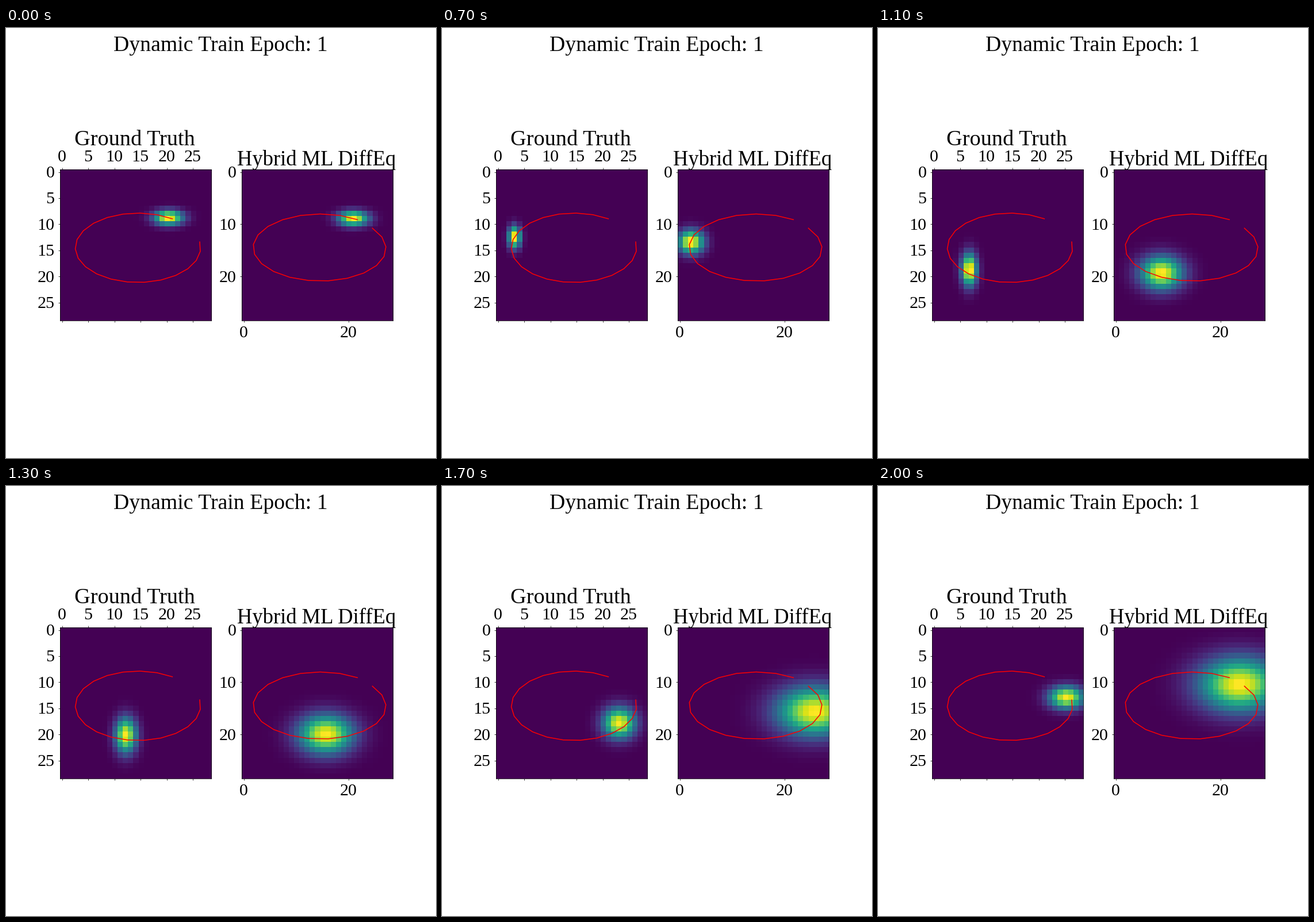
Write a matplotlib script that moves like this. It is 748 px wide and 748 px high and loops after 2.1 s.

```python
import matplotlib.pyplot as plt
import numpy as np
from matplotlib.animation import FuncAnimation

plt.rcParams["font.family"] = "Liberation Serif"

INCHES, DPI = 11, 68
SIZE = INCHES * DPI
GRID, STEPS = 29, 21

cells = np.arange(GRID)
steps = np.arange(STEPS)


def orbit(centre, radii, start, rate):
    """Elliptic path in grid cells; angles in degrees, one pair for x and y."""
    ax, ay = (np.radians(s + r * steps) for s, r in zip(start, rate))
    return np.column_stack((centre[0] + radii[0] * np.cos(ax),
                            centre[1] - radii[1] * np.sin(ay)))


def profile(pos, sigma):
    p = np.exp(-((cells - pos) / sigma) ** 2 / 2)
    return p / p.max()


def blob(step, path, rate, onset):
    """Gaussian that widens with its distance from the corner, then over time."""
    x, y = (path[step] + 0.4) / 1.06
    grow_x, grow_y = (r * max(step - t, 0) for r, t in zip(rate, onset))
    return np.outer(profile(y, 0.115 * y - 0.05 + grow_y),
                    profile(x, 0.066 * x + 0.58 + grow_x))


fig, axes = plt.subplots(1, 2, figsize=(INCHES, INCHES), dpi=DPI)


def write(x, y, text, size, ha="center"):
    """Text of a pixel size with its baseline at pixel (x, y) from the top left."""
    fig.text(x / SIZE, 1 - y / SIZE, text, size=size * 72 / DPI, ha=ha,
             va="baseline")


def panel(ax, path, rate, onset, xticks, yticks, label_base):
    img = ax.imshow(blob(0, path, rate, onset), vmin=0, vmax=1, cmap="viridis",
                    interpolation="nearest")
    ax.plot(*path.T, color="red", lw=1.6)
    ax.set(xticks=xticks, yticks=yticks,
           xlim=(-0.5, GRID - 0.5), ylim=(GRID - 0.5, -0.5))
    ax.tick_params(labelleft=False, labelbottom=False)

    ax.apply_aspect()
    box = ax.get_position()
    left, top = box.x0 * SIZE, (1 - box.y1) * SIZE
    cell = box.width * SIZE / GRID
    for v in xticks:
        write(left + (v + 0.5) * cell - 0.7, label_base, str(v), 30)
    for v in yticks:
        write(left - 9, top + (v + 0.5) * cell + 9.5, str(v), 30, "right")
    return lambda step: img.set_data(blob(step, path, rate, onset))


fives = range(0, GRID, 5)
truth = orbit((14.47, 14.5), (12, 6.64), (56.7, 56.7), (15.65, 15.65))
model = orbit((14.44, 14.45), (12.72, 6.42), (55.3, 56.2), (17.1, 16.95))

redraw = (
    panel(axes[0], truth, (0, 0), (0, 0), fives, fives, 232.5),
    panel(axes[1], model, (0.17, 0.29), (1.5, 12), (0, 20), (0, 10, 20), 538.5),
)
axes[0].tick_params(top=True)

write(373, 40.5, "Dynamic Train Epoch: 1", 37.8)
write(223.5, 204.5, "Ground Truth", 38.3)
write(540.5, 239, "Hybrid ML DiffEq", 36.5)


def update(step):
    for draw in redraw:
        draw(step)


anim = FuncAnimation(fig, update, frames=STEPS, interval=100, repeat=True,
                     repeat_delay=0, blit=False)
plt.show()
```
